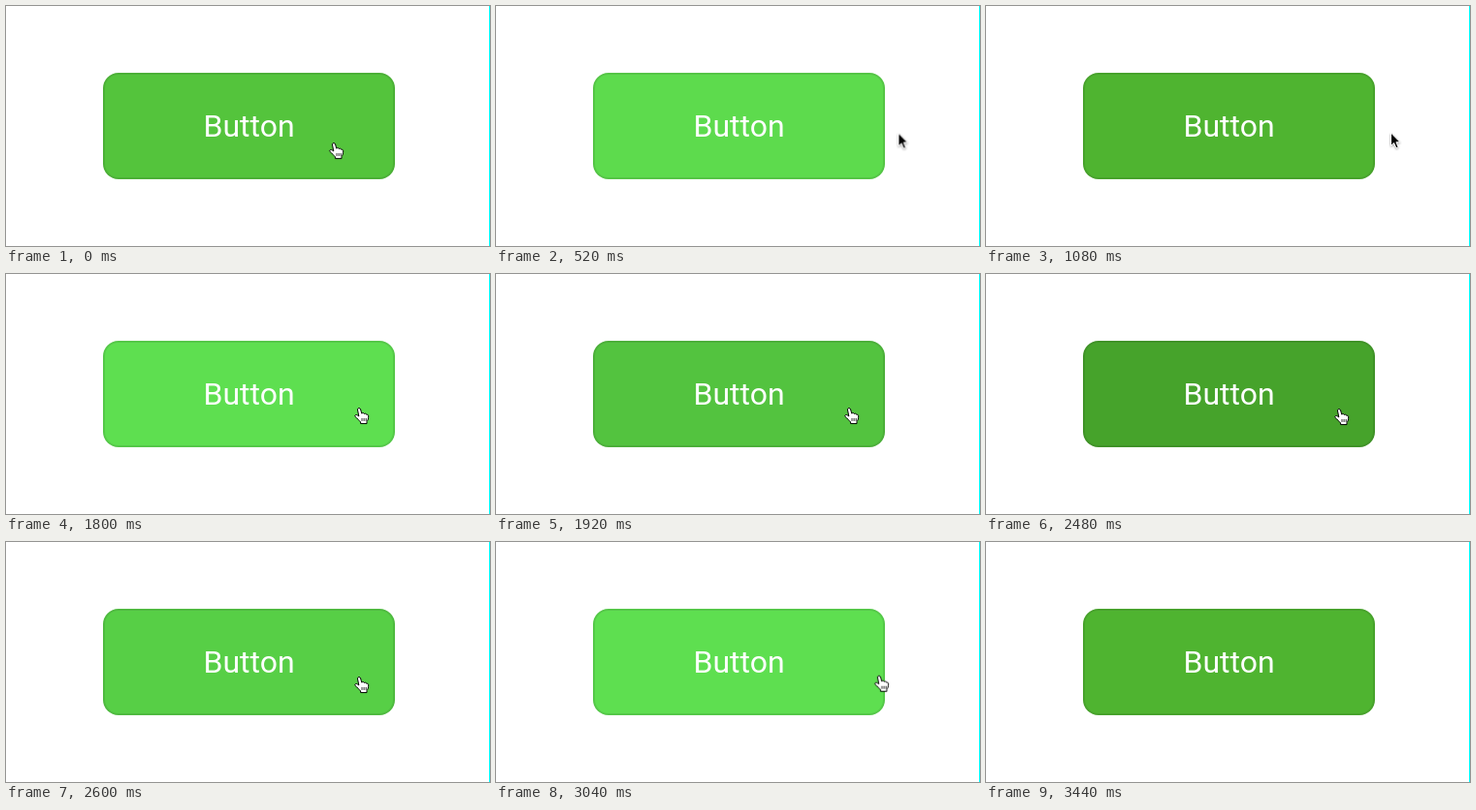
Animation, 499 px wide and 248 px high, one loop 3840 ms. Source, as an HTML page:

```html
<!DOCTYPE html>
<html lang="en">
<head>
<meta charset="utf-8">
<title>Button states</title>
<style>
  :root {
    --normal: rgb(79, 180, 48);
    --hover: rgb(94, 223, 80);
    --active: rgb(57, 131, 24);
    --loop: 3840ms;
  }
  html, body {
    margin: 0;
    width: 100%;
    height: 100%;
    overflow: hidden;
    background: #fff;
  }
  .stage {
    position: relative;
    width: 499px;
    height: 248px;
    overflow: hidden;
  }
  .edge {
    position: absolute;
    left: 498px;
    top: 0;
    width: 1px;
    height: 100%;
    background: #0ff;
  }
  .button {
    position: absolute;
    left: 100px;
    top: 69px;
    width: 301px;
    height: 110px;
    box-sizing: border-box;
    border: 2px solid rgba(0, 0, 0, .1);
    border-radius: 16px;
    color: #fff;
    font: 32px/106px Roboto, sans-serif;
    text-align: center;
    animation: fade var(--loop) infinite;
  }
  .cursor {
    position: absolute;
    left: 0;
    top: 0;
    overflow: visible;
    animation: move var(--loop) infinite;
  }
  .hand { animation: hand var(--loop) step-end infinite; }
  .arrow {
    filter: drop-shadow(0 1px 1px rgba(0, 0, 0, .35));
    animation: arrow var(--loop) step-end infinite;
  }

  @keyframes fade {
    0% {
      background-color: rgb(84, 196, 60);
      animation-timing-function: cubic-bezier(.2, .53, .3, 1);
    }
    7.97%, 12.5% { background-color: var(--hover); }
    22.92%, 29.84% { background-color: var(--normal); }
    40.26%, 47.92% { background-color: var(--hover); }
    58.33%, 62.29% { background-color: var(--active); }
    72.71%, 79.43% { background-color: var(--hover); }
    89.84%, 100% { background-color: var(--normal); }
  }
  @keyframes move {
    0% { transform: translate(338px, 142px); animation-timing-function: ease-out; }
    5.2%, 9.37% { transform: translate(330px, 144px); }
    16.15%, 26.04% { transform: translate(424px, 130px); animation-timing-function: ease-in-out; }
    34.9% { transform: translate(364px, 139px); animation-timing-function: step-end; }
    62.4%, 76.04% { transform: translate(364px, 140px); animation-timing-function: ease-in-out; }
    85.94%, 100% { transform: translate(510px, 134px); }
  }
  @keyframes hand {
    0%, 29.84%, 100% { opacity: 1; }
    12.5%, 79.43% { opacity: 0; }
  }
  @keyframes arrow {
    0%, 29.84%, 100% { opacity: 0; }
    12.5%, 79.43% { opacity: 1; }
  }
</style>
</head>
<body>
<div class="stage">
  <div class="button">Button</div>
  <div class="edge"></div>
  <svg class="cursor" width="1" height="1">
    <g class="hand" stroke="#000" stroke-linejoin="round">
      <path fill="#fff" d="M-1.6 .8C-1-1 1.2-.8 1.6 1L2.8 5.2C3.6 4.2 5.2 4.4 5.4 5.6C6.4 4.8 7.6 5.2 7.8 6.4C9 6 9.8 6.8 9.7 8C9.6 10.5 9.3 12 8 13.4V15.6H1.6V14C0 12.4-1.6 10.4-4.2 8.2C-4.6 6.6-3 6-1.6 7L-.2 8Z"/>
      <path stroke-width=".8" d="M3 10v3M5.1 10v3M7.2 10v3"/>
    </g>
    <path class="arrow" stroke="#fff" d="M.5 0V13.4L3.6 10.5L5.9 15.8L8.1 14.9L5.9 9.7H10Z"/>
  </svg>
</div>
</body>
</html>
```
